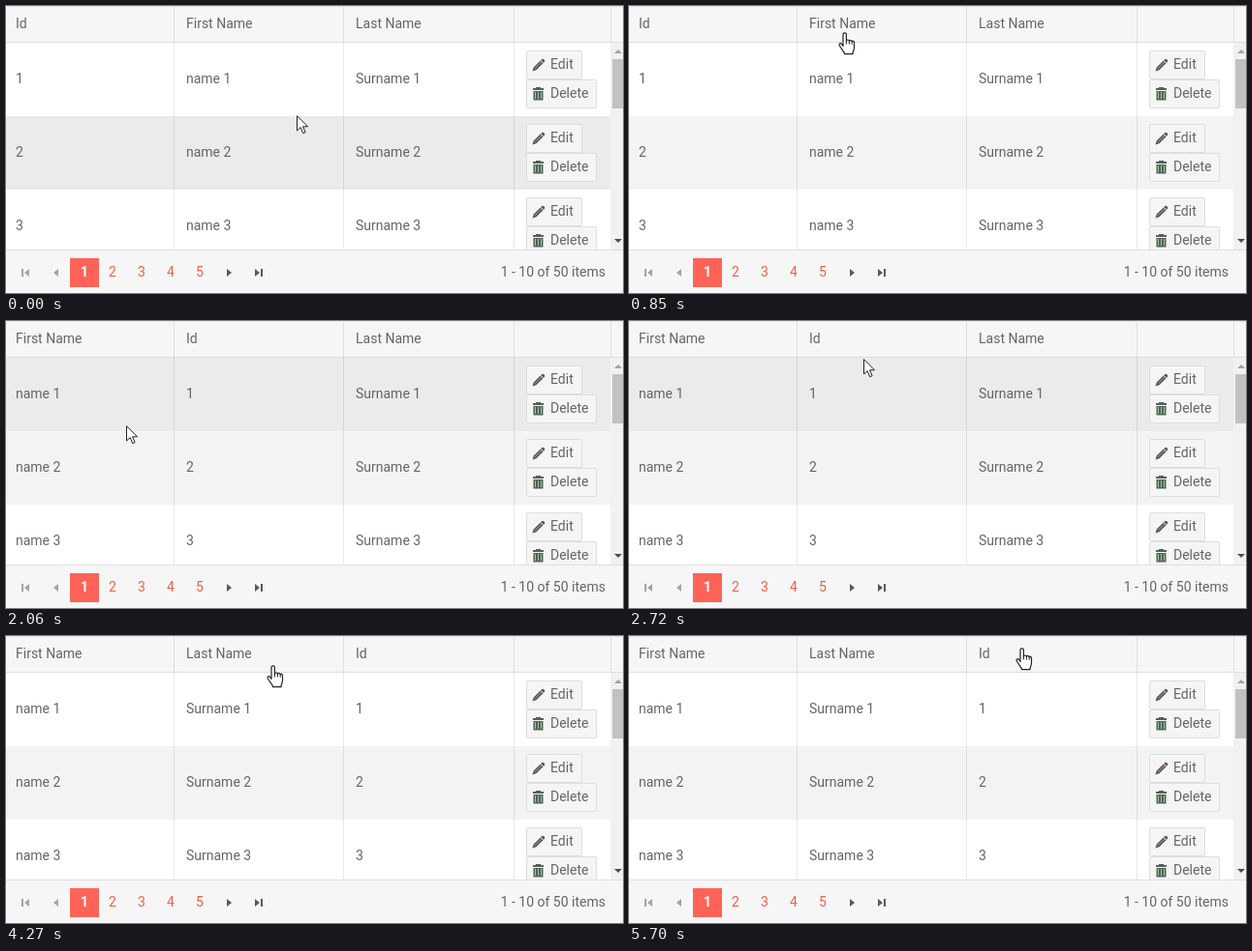
These frames come from a looping animation (637x297 px, 6030 ms). An HTML page:

```html
<!DOCTYPE html>
<html lang="en">
<head>
<meta charset="utf-8">
<title>Column reordering</title>
<style>
  html, body { margin: 0; width: 100%; height: 100%; overflow: hidden; background: #fff; }
  svg { display: block; width: 637px; height: 297px; }
  text { font: 14px Roboto, Arial, sans-serif; fill: #656565; }
  .page { fill: #e9614a; text-anchor: middle; }
  .current { fill: #fff; font-weight: 700; }
</style>
</head>
<body>
<svg id="stage" viewBox="0 0 637 297"></svg>
<script>
const LOOP = 6030;
const ROW_TOP = 38, ROW_H = 76;
const COL_X = [10, 186, 361];
const FIELDS = {
  id: { title: 'Id', value: n => n },
  first: { title: 'First Name', value: n => 'name ' + n },
  last: { title: 'Last Name', value: n => 'Surname ' + n }
};

// Column order from each moment on
const ORDERS = [
  [0, ['id', 'first', 'last']],
  [1720, ['first', 'id', 'last']],
  [4270, ['first', 'last', 'id']]
];

// Pointer stops: time, shape, left, top
const STOPS = [
  [0, 'arrow', 300, 113], [100, 'arrow', 299, 97], [200, 'arrow', 294, 74], [300, 'arrow', 286, 50],
  [400, 'hand', 270, 20], [630, 'hand', 262, 22], [740, 'hand', 238, 26], [850, 'hand', 216, 27],
  [960, 'hand', 206, 27], [1070, 'hand', 150, 25], [1170, 'hand', 94, 24], [1290, 'hand', 75, 18],
  [1390, 'hand', 59, 14], [1840, 'hand', 64, 20], [2060, 'arrow', 124, 108], [2180, 'arrow', 113, 127],
  [2500, 'arrow', 130, 122], [2610, 'arrow', 182, 85], [2720, 'arrow', 242, 39], [2830, 'hand', 300, 33],
  [2950, 'hand', 364, 32], [3060, 'hand', 411, 31], [3160, 'hand', 376, 25], [3270, 'hand', 366, 25],
  [3380, 'hand', 323, 24], [3490, 'hand', 300, 24], [3600, 'hand', 282, 24], [3720, 'hand', 267, 24],
  [4270, 'hand', 269, 30], [4920, 'arrow', 272, 44], [5030, 'arrow', 268, 70], [5140, 'arrow', 258, 84],
  [5250, 'arrow', 250, 72], [5370, 'arrow', 246, 46], [5480, 'hand', 241, 15], [5580, 'hand', 326, 14],
  [5700, 'hand', 399, 12]
];

// Drags: start, drop, dragged field, left edge of the drop marker
const DRAGS = [[1070, 1720, 'first', 0], [3380, 4270, 'last', 173]];

const rect = (x, y, w, h, fill, extra = '') =>
  `<rect x="${x}" y="${y}" width="${w}" height="${h}" fill="${fill}" ${extra}/>`;
const path = (d, fill, extra = '') => `<path d="${d}" fill="${fill}" ${extra}/>`;
const label = (x, y, s, extra = '') => `<text x="${x}" y="${y}" ${extra}>${s}</text>`;
const group = (x, y, body, extra = '') => `<g transform="translate(${x} ${y})" ${extra}>${body}</g>`;

const pencil =
  path('M.5 13.5l1.2-4L10 1.2q1.2-1 2.6.2t.2 2.6L4.5 12.3z', '#5f5656') +
  path('M3 10.8L10.2 3.6', 'none', 'stroke="#a89c96"') +
  path('M8.8 2.2l3 3', 'none', 'stroke="#f5f5f5"');

const trash =
  rect(4, 0, 5, 1, '#55605a') + rect(1, 1, 11, 2, '#55605a') +
  path('M1.5 4h10v9.5h-10z', '#55605a') +
  [3, 6, 9].map(x => rect(x, 5, 1, 7, '#8fd08f')).join('');

const button = (y, w, icon, caption) =>
  rect(537.5, y + .5, w - 1, 29, '#f5f5f5', 'rx="1.5" stroke="#dedede"') +
  group(543, y + 8, icon) + label(562, y + 19, caption);

const arrow = path('M.5 .7V16l3.6-3.4 2.6 6.1 2.4-1L6.5 11.8h5z', '#fff', 'stroke="#222"');

const hand =
  path('M5 14.5V2.6a1.7 1.7 0 0 1 3.4 0V9c.2-1.4 3-1.3 3 .3.3-1.2 2.7-1 2.8.5.5-.9 2.3-.5 2.3 1.2v5' +
    'c0 2.5-1.5 3.5-1.5 6.7H6.5c0-2.7-3-4.7-5.2-8.7-1-2 .8-2.8 2-1.8z', '#fff',
    'stroke="#222" stroke-width="1.2" stroke-linejoin="round"') +
  path('M8.4 8.5v4M11.4 9v3.5M14.2 9.8v3', 'none', 'stroke="#222"');

const dropMark = path('M0 1h12l-6 6z', '#656565') + rect(5, 6, 2, 31, '#656565');

function table() {
  let s = '';
  for (let i = 0; i < 3; i++) {
    const y = ROW_TOP + i * ROW_H;
    s += rect(0, y, 624, ROW_H, '#fff', `id="row${i}"`) +
      button(y + 8, 58, pencil, 'Edit') + button(y + 38, 73, trash, 'Delete');
  }
  return s + '<g id="cells"></g>';
}

function header() {
  return rect(0, 0, 637, 38, '#f6f6f6') + rect(0, 0, 637, 1, '#e6e6e6') +
    rect(0, 37, 637, 1, '#dfdfdf') + '<g id="titles"></g>' +
    [173, 348, 524].map(x => rect(x, 1, 1, 251, '#000', 'opacity=".09"')).join('') +
    rect(624, 1, 1, 36, '#e0e0e0');
}

function scrollbar() {
  return rect(624, 38, 13, 214, '#f1f1f1') + rect(626, 55, 11, 51, '#c1c1c1') +
    path('M628 49h8l-4-4z', '#a3a3a3') + path('M628 241h8l-4 4z', '#505050');
}

function pager() {
  const left = 'M4-4v8l-5-4z', right = 'M-3-4v8l5-4z';
  const pale = '#a2a4a9', dark = '#565a60';
  let s = rect(0, 252, 637, 45, '#f6f6f6') + rect(0, 252, 637, 1, '#dfdfdf') +
    group(20, 276, path(left, pale) + rect(-4, -4, 2, 8, pale)) +
    group(50, 276, path(left, pale)) +
    group(231, 276, path(right, dark)) +
    group(260, 276, path(right, dark) + rect(3, -4, 2, 8, dark)) +
    rect(66, 261, 30, 30, '#ff6358');
  for (let n = 1; n <= 5; n++)
    s += label(51 + n * 30 - (n > 1), 280, n, `class="page${n === 1 ? ' current' : ''}"`);
  return s + label(619, 280, '1 - 10 of 50 items', 'text-anchor="end"');
}

const $ = id => document.getElementById(id);
$('stage').innerHTML =
  table() + scrollbar() + header() + pager() +
  group(0, 0, dropMark, 'id="mark"') +
  group(0, 0, rect(.5, .5, 97, 29, '#f6f6f6', 'stroke="#d5d5d5"') +
    path('M8 15h10M13 10v10', 'none', 'stroke="#656565" stroke-width="2"') +
    label(24, 20, '', 'id="clueText"'), 'id="clue"') +
  group(0, 0, arrow, 'id="arrow"') + group(0, 0, hand, 'id="hand"');

const latest = (list, t) => list.filter(e => e[0] <= t).pop();
const show = (id, on) => $(id).setAttribute('visibility', on ? 'visible' : 'hidden');
const move = (id, x, y) => $(id).setAttribute('transform', `translate(${x} ${y})`);

let shownOrder;
function setOrder(order) {
  if (order === shownOrder) return;
  shownOrder = order;
  $('titles').innerHTML = order.map((f, c) => label(COL_X[c], 23, FIELDS[f].title)).join('');
  $('cells').innerHTML = [1, 2, 3].map(n =>
    order.map((f, c) => label(COL_X[c], 4 + n * ROW_H, FIELDS[f].value(n))).join('')).join('');
}

function draw(t) {
  setOrder(latest(ORDERS, t)[1]);

  const [, shape, x, y] = latest(STOPS, t);
  for (const s of ['arrow', 'hand']) {
    show(s, s === shape);
    move(s, x, y);
  }

  // The arrow's tip decides which row is lit
  const hover = shape === 'arrow' ? Math.floor((y + 1 - ROW_TOP) / ROW_H) : -1;
  for (let i = 0; i < 3; i++)
    $('row' + i).setAttribute('fill', i === hover ? '#ebebeb' : i % 2 ? '#f3f3f3' : '#fff');

  const drag = DRAGS.find(d => t >= d[0] && t < d[1]);
  show('clue', drag);
  show('mark', drag);
  if (drag) {
    $('clueText').textContent = FIELDS[drag[2]].title;
    move('clue', x + 6, y + 1);
    move('mark', drag[3], 0);
  }
}

const start = performance.now();
function tick() {
  draw((performance.now() - start) % LOOP);
  requestAnimationFrame(tick);
}
tick();
</script>
</body>
</html>
```
